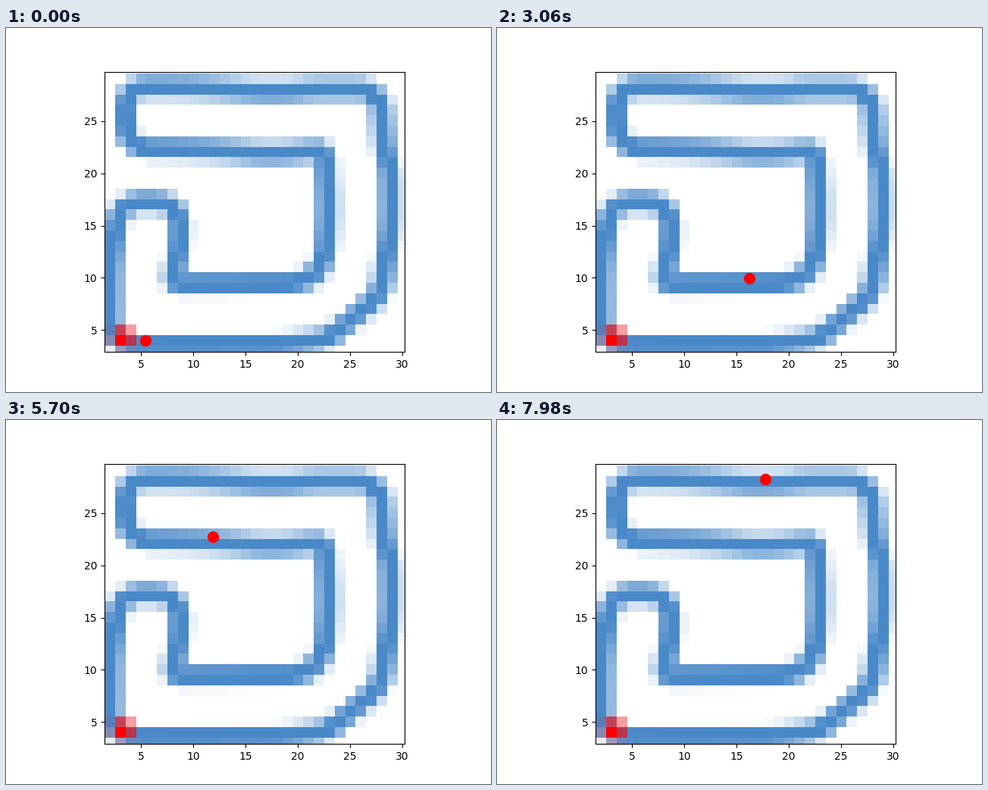
Animation, 640 px wide and 480 px high, one loop 8000 ms. Source, as a matplotlib script:

```python
import numpy as np
import matplotlib.pyplot as plt
from matplotlib.animation import FuncAnimation

W, H = 31, 30
BLUE = np.array([74, 137, 200]) / 255
RED = np.array([1.0, 0.0, 0.0])
HALF_WIDTH = 0.97
TICK, HOLD, FRAMES = 20, 3, 400

# corners of the track's centre line: x, y, rounding
CORNERS = np.array([
    (4.92, 3.52, 0), (2.1, 3.55, 2.5), (2.15, 11, 1), (2.85, 17.3, 2.5),
    (8.7, 17.2, 2.5), (8.6, 13, 1), (8.0, 9.4, 0.8), (22.4, 9.5, 3.5),
    (22.85, 16.5, 2), (22.55, 22.2, 1), (17.5, 21.75, 2), (11.5, 22.27, 3),
    (3.55, 22.4, 2.3), (3.45, 28.25, 2.3), (11, 28.2, 3), (16, 27.75, 2),
    (19.5, 27.8, 1), (21.5, 28, 1), (27.8, 28, 2.3), (28.25, 22.5, 1),
    (28.8, 20, 1), (28.85, 15, 2), (27.95, 8.5, 1.5), (22.8, 4.05, 1.5),
    (18.5, 3.55, 1.5),
])

# step at which the dot passes a place on the track: step, x, y
PASSES = np.array([
    (0, 4.92, 3.52), (35, 8.5, 12.0), (51, 15.7, 9.5), (76, 22.6, 20.7),
    (95, 11.4, 22.2), (112, 3.9, 26.9), (133, 17.3, 27.7),
])


def toward(a, b, r):
    return a + r * (b - a) / np.hypot(*(b - a))


def rounded_loop(corners, n=3000):
    """Closed polygon with curved corners, sampled evenly by length."""
    xy, radius = corners[:, :2], corners[:, 2]
    t = np.linspace(0, 1, 12)[:, None]
    pieces = []
    for before, p, after, r in zip(np.roll(xy, 1, 0), xy,
                                   np.roll(xy, -1, 0), radius):
        a, b = toward(p, before, r), toward(p, after, r)
        pieces.append((1 - t) ** 2 * a + 2 * t * (1 - t) * p + t * t * b)
    line = np.vstack(pieces + [xy[:1]])
    length = np.r_[0, np.cumsum(np.hypot(*np.diff(line, axis=0).T))]
    s = np.linspace(0, length[-1], n)
    return np.column_stack([np.interp(s, length, axis) for axis in line.T])


def paint_grid(line):
    """Shade each cell by how much of it the wide track line covers."""
    x, y = np.meshgrid(np.arange(W), np.arange(H))
    dist = np.hypot(x[..., None] - line[:, 0], y[..., None] - line[:, 1])
    cover = np.clip(HALF_WIDTH + 0.5 - dist.min(axis=-1), 0, 1)[..., None]
    grid = 1 + cover * (BLUE - 1)
    # start square, spilling over into its neighbours
    spill = np.array([0.15, 1, 0.6])
    tint = np.outer(spill, spill)[..., None]
    start = grid[3:6, 2:5]
    start += tint * (RED - start)
    return grid


line = rounded_loop(CORNERS)
marks = [np.argmin(np.hypot(*(line - place).T)) for place in PASSES[:, 1:]]


def position(step):
    """Dot's place, half a cell up and right of the centre line."""
    at = np.interp(step, PASSES[:, 0], marks)
    index = np.arange(len(line))
    return [np.interp(at, index, axis) + 0.5 for axis in line.T]


fig, ax = plt.subplots(figsize=(6.4, 4.8), dpi=100)
ax.imshow(paint_grid(line), origin="lower", interpolation="nearest",
          extent=(-0.5, W - 0.5, -0.5, H - 0.5))
ax.set_xlim(1.485, 30.245)
ax.set_ylim(2.9, 29.74)
ax.set_xticks(range(5, 31, 5))
ax.set_yticks(range(5, 26, 5))
dot, = ax.plot([], [], "ro", markersize=10)


def update(frame):
    x, y = position(frame // HOLD)
    dot.set_data([x], [y])
    return dot,


anim = FuncAnimation(fig, update, frames=FRAMES, interval=TICK,
                     repeat=True, repeat_delay=0)
plt.show()
```
